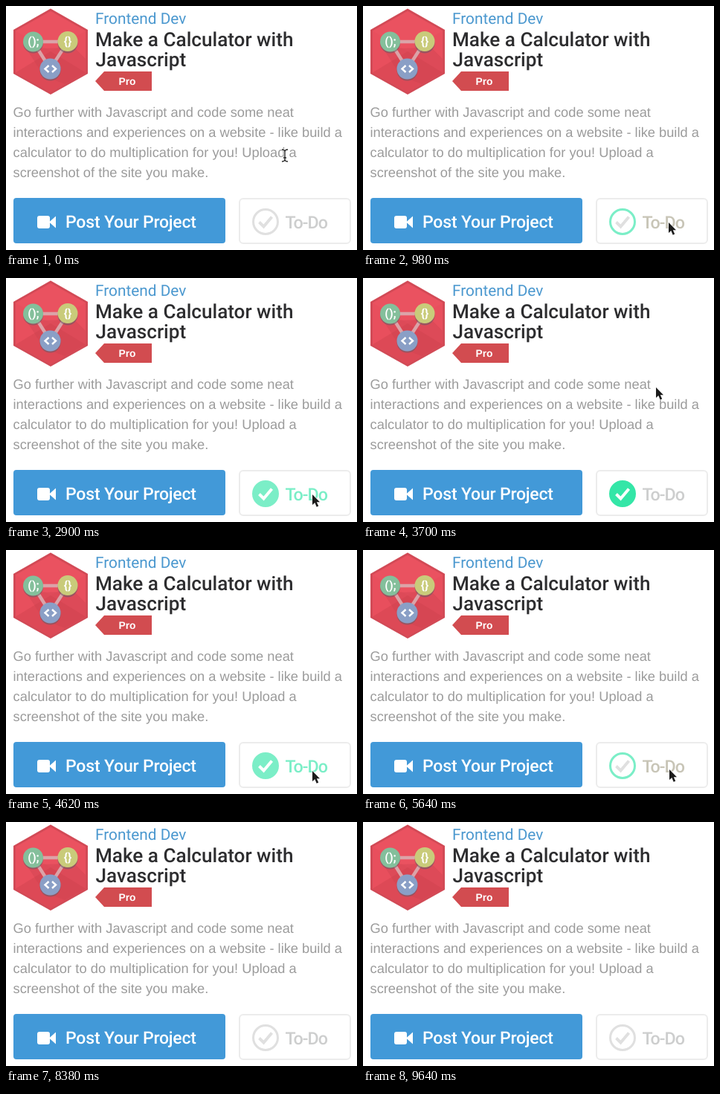
Recreate the animation shown at these times as an HTML page. Size 472 by 328 pixels, loop 9660 ms.

```html
<!DOCTYPE html>
<html lang="en">
<head>
<meta charset="utf-8">
<title>Project card</title>
<style>
  html, body { margin: 0; width: 100%; height: 100%; overflow: hidden; background: #fff; }
  svg { display: block; width: 100%; height: 100%; text-rendering: geometricPrecision; }
  .head { font-family: Roboto, sans-serif; font-weight: 500; }
  .body { font: 18.25px "Liberation Sans", Arial, sans-serif; fill: #9b9b9b; }
  .tag { font: bold 13.8px "Liberation Sans", Arial, sans-serif; fill: #fff; }
  .code { font: bold 16px Roboto, sans-serif; fill: #fff; text-anchor: middle; }
</style>
</head>
<body>
<svg viewBox="0 0 472 328">
  <rect width="472" height="328" fill="#fff"/>

  <!-- badge -->
  <path d="M60 3.5 110 32V91L60 119 10 91V32Z" fill="#d24a56"/>
  <path d="M60 7 107 33.500V89.500L60 115.500 13 89.500V33.500Z" fill="#e84f5d"/>
  <path d="M60 7 107 33.500 60 61 13 33.500Z" fill="#ea5260"/>
  <path d="M13 89.500 60 61 107 89.500 60 115.500Z" fill="#dd4956"/>
  <path d="M45 57 92 56 107 71V89.500L79 105 51 94 27 57Z" fill="#c93f4d" opacity=".35"/>
  <path d="M36.500 48H83L59.500 84.500Z" fill="none" stroke="#dba3a8" stroke-width="4.500"/>
  <g fill="#6f5a66" opacity=".6">
    <circle cx="36.500" cy="50" r="13.500"/>
    <circle cx="83" cy="50" r="13.500"/>
    <circle cx="59.500" cy="86.500" r="14"/>
  </g>
  <circle cx="36.500" cy="48" r="13.500" fill="#84bf9b"/>
  <circle cx="83" cy="47.500" r="13.500" fill="#c9cb7a"/>
  <circle cx="59.500" cy="84.500" r="14" fill="#8a9fc6"/>
  <text class="code" x="37" y="53">();</text>
  <text class="code" x="83" y="52.500">{}</text>
  <path d="M57.500 80 52.500 84.500 57.500 89M62 80 67 84.500 62 89" fill="none" stroke="#fff" stroke-width="2.4"/>

  <!-- headings -->
  <g class="head">
    <text x="120" y="24" font-size="20.8" style="font-weight:400" fill="#4b98cf">Frontend Dev</text>
    <g font-size="26.1" fill="#2d2d2f">
      <text x="120" y="53.500">Make a Calculator with</text>
      <text x="120.500" y="81">Javascript</text>
    </g>
  </g>
  <path d="M120 101 132 88H196V114H132Z" fill="#d24c50"/>
  <text class="tag" x="151.500" y="105.500">Pro</text>

  <g class="body">
    <text x="9.500" y="149">Go further with Javascript and code some neat</text>
    <text x="9.500" y="176">interactions and experiences on a website - like build a</text>
    <text x="9.500" y="203" letter-spacing=".06">calculator to do multiplication for you! Upload a</text>
    <text x="9.500" y="230">screenshot of the site you make.</text>
  </g>

  <!-- buttons -->
  <rect x="10" y="258" width="285" height="61" rx="4" fill="#4299d8"/>
  <rect x="42" y="282" width="17" height="17" rx="3" fill="#fff"/>
  <path d="M58 290.500 67 282.500V298.500Z" fill="#fff"/>
  <text class="head" x="80" y="298" font-size="23" letter-spacing="-.2" fill="#fff">Post Your Project</text>

  <rect x="314" y="259" width="149" height="60" rx="5" fill="#fff" stroke="#ececec" stroke-width="2"/>
  <circle id="ring" cx="349" cy="290" r="16.5" stroke-width="3"/>
  <path id="check" d="M340.500 290.500 346.500 296.500 357.500 283.500" fill="none" stroke-width="4"/>
  <text id="todo" class="head" x="375.500" y="298.500" font-size="23.300" letter-spacing="-.9">To-Do</text>

  <!-- pointers, hot spot at 0,0 -->
  <path id="arrow" d="M0 0V14L3.300 11 5.700 16.700 8.200 15.600 5.800 10.200H10Z" fill="#1b1b1b" stroke="#fff" stroke-width="1.2" paint-order="stroke"/>
  <g id="beam" fill="none">
    <path d="M-4-8Q0-8 0-5Q0-8 4-8M0-5V5M-4 8Q0 8 0 5Q0 8 4 8M-2 3H2" stroke="#fff" stroke-width="3" opacity=".8"/>
    <path d="M-4-8Q0-8 0-5Q0-8 4-8M0-5V5M-4 8Q0 8 0 5Q0 8 4 8M-2 3H2" stroke="#222" stroke-width="1.3"/>
  </g>
</svg>
<script>
  const LOOP = 9660, FADE = 200;
  const $ = id => document.getElementById(id);
  const ring = $('ring'), check = $('check'), todo = $('todo'), arrow = $('arrow'), beam = $('beam');

  const PALE = [224, 224, 224], GRAY = [205, 206, 206], BEIGE = [200, 197, 183];
  const WHITE = [255, 255, 255], MINT = [123, 238, 199], GREEN = [52, 230, 167];

  // pointer stops: time, x, y
  const stops = [
    [0, 375, 201], [300, 375, 201], [900, 411, 291], [1500, 412, 290],
    [1960, 412, 282], [2500, 412, 282], [2900, 412, 291], [3100, 412, 291],
    [3550, 394, 147], [4000, 394, 147], [4600, 412, 297], [5300, 412, 295],
    [6250, 412, 295], [6850, 382, 138], [7850, 382, 138], [8250, 486, 116],
    [LOOP, 486, 116]
  ];
  const lineEnds = [388, 453, 392, 271];

  const clamp = v => Math.max(0, Math.min(1, v));
  const smooth = p => p * p * (3 - 2 * p);
  const ramp = (t, from) => smooth(clamp((t - from) / FADE));
  const mix = (a, b, p) => a.map((v, i) => v + (b[i] - v) * p);
  const rgb = c => `rgb(${c.map(Math.round)})`;

  function pointerAt(t) {
    const i = stops.findIndex(s => s[0] > t);
    const a = stops[i - 1], b = stops[i];
    return mix(a, b, smooth((t - a[0]) / (b[0] - a[0]))).slice(1);
  }

  function overText(x, y) {
    return x < lineEnds[Math.floor((y - 130) / 27)];
  }

  function draw(t) {
    const hover = ramp(t, 660) - ramp(t, 3235) + ramp(t, 4400) - ramp(t, 6430);
    const on = ramp(t, 1750) - ramp(t, 5350);
    const solid = mix(GREEN, MINT, hover);

    ring.setAttribute('fill', rgb(solid));
    ring.setAttribute('fill-opacity', on);
    ring.setAttribute('stroke', rgb(mix(mix(PALE, MINT, hover), solid, on)));
    check.setAttribute('stroke', rgb(mix(PALE, WHITE, on)));
    todo.setAttribute('fill', rgb(mix(GRAY, mix(BEIGE, MINT, on), hover)));

    const [x, y] = pointerAt(t);
    const text = overText(x, y);
    for (const [el, shown] of [[arrow, !text], [beam, text]]) {
      el.setAttribute('transform', `translate(${Math.round(x)} ${Math.round(y)})`);
      el.setAttribute('visibility', shown ? 'visible' : 'hidden');
    }
  }

  const start = performance.now();
  function tick() {
    draw((performance.now() - start) % LOOP);
    requestAnimationFrame(tick);
  }
  tick();
</script>
</body>
</html>
```
